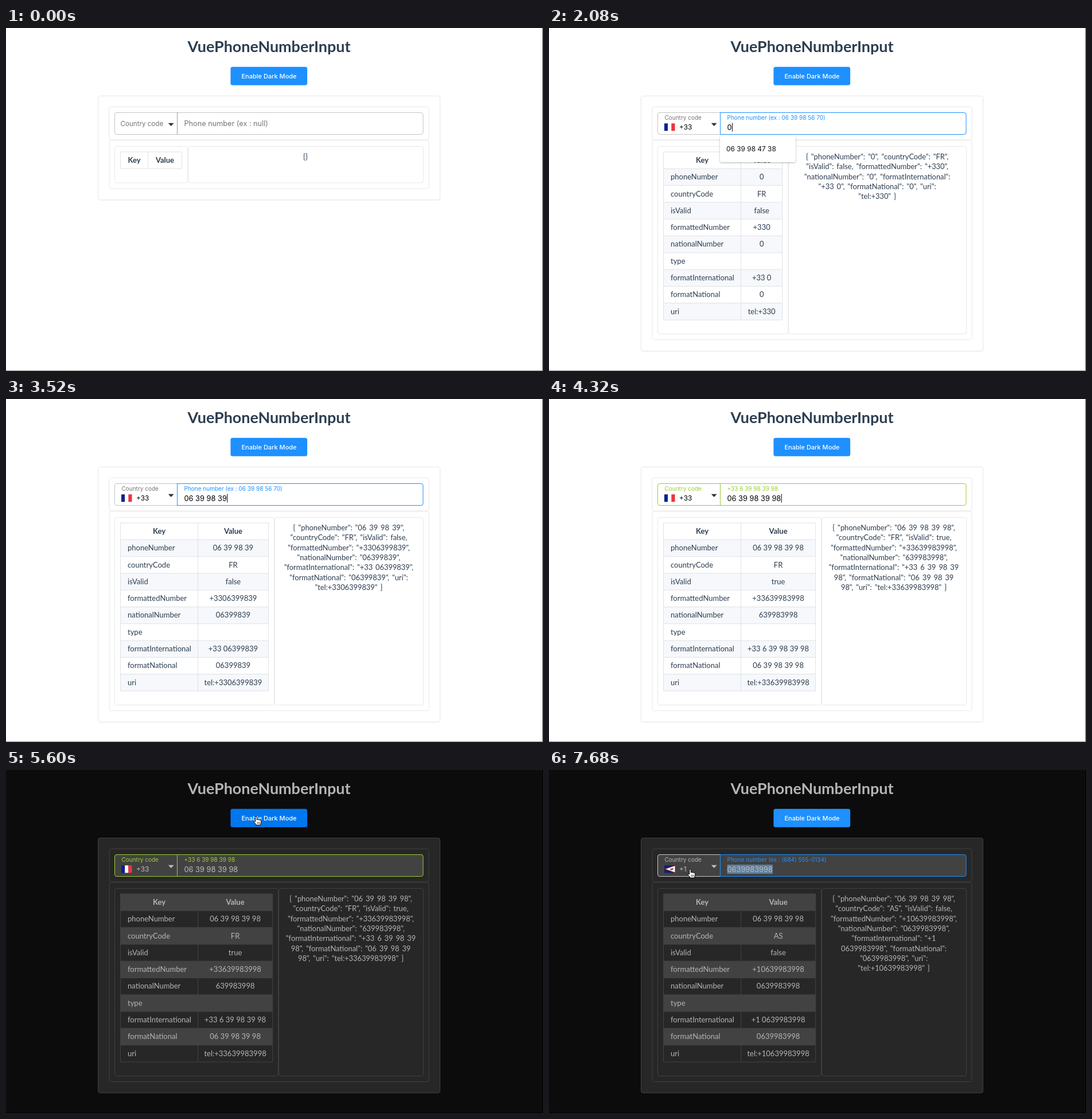
Write an HTML page that moves like this. It is 936 by 598 pixels and loops after 8000 ms.

```html
<!DOCTYPE html>
<html lang="en">
<head>
<meta charset="utf-8">
<title>VuePhoneNumberInput</title>
<style>
  html, body { margin: 0; width: 100%; height: 100%; overflow: hidden; }
  svg { display: block; }
  text { font-family: Inter, sans-serif; white-space: pre; }
  .page { font-family: Lato, sans-serif; }
  .json { word-spacing: .13em; }
  .shadow { filter: drop-shadow(0 1px 1.5px rgba(0, 0, 0, .3)); }
  .soft { filter: drop-shadow(0 1px 1px rgba(0, 0, 0, .04)); }
</style>
</head>
<body>
<svg id="stage" width="936" height="598" viewBox="0 0 936 598">
  <clipPath id="menu"><rect x="190" y="186" width="210" height="192"/></clipPath>
  <g id="scene"></g>
</svg>
<script>
const LOOP = 8000, STEP = 160, BLUE = '#1e90ff', GREEN = '#9acd32';
const LIGHT = {
  page: '#fff', card: '#fff', line: '#e9e9e9', text: '#2c3e50', field: '#fff', edge: '#c4c4c4',
  hint: '#747474', value: '#000', arrow: '#333', header: '#fff', odd: '#f6f8fb', even: '#fff',
  grid: '#dfe2e5', item: '#2c3e50', hover: '#f2f2f2', right: '#444', bottom: '#888'
};
const DARK = {
  page: '#0c0c0c', card: '#272727', line: '#404040', text: '#b5b5b5', field: '#424242', edge: '#c8c8c8',
  hint: '#b5b5b5', value: '#bdbdbd', arrow: '#bdbdbd', header: '#424242', odd: '#272727', even: '#424242',
  grid: '#424242', item: '#b9b9b9', hover: '#383838', right: '#000', bottom: '#000'
};
const TYPING = [
  [2080, '0'], [2240, '06'], [2400, '06 3'], [2720, '06 39'], [2880, '06 39 9'], [3040, '06 39 98'],
  [3200, '06 39 98 3'], [3520, '06 39 98 39'], [3840, '06 39 98 39 9'], [4160, '06 39 98 39 98']
];
const SUGGESTION = '06 39 98 47 38';
const EXAMPLES = { FR: '06 39 98 56 70', AS: '(684) 555-0134' };
const KEYS = ['phoneNumber', 'countryCode', 'isValid', 'formattedNumber', 'nationalNumber', 'type',
  'formatInternational', 'formatNational', 'uri'];
// Pointer trips: start time, end time, from, to, hidden from
const TRIPS = [
  [160, 640, 300, 300, 222, 169, 1760],
  [4960, 5440, 446, 330, 437, 82, 6080],
  [5920, 6240, 437, 82, 247, 174, LOOP]
];

const rect = (x, y, w, h, fill, more = '') =>
  `<rect x="${x}" y="${y}" width="${w}" height="${h}" fill="${fill}" ${more}/>`;
const path = (d, fill, more = '') => `<path d="${d}" fill="${fill}" ${more}/>`;
const text = (x, y, s, size, fill, more = '') =>
  `<text x="${x}" y="${y}" font-size="${size}" fill="${fill}" ${more}>${s}</text>`;
const box = (x, y, right, bottom, fill, stroke, more = '') =>
  rect(x, y, right - x, bottom - y, fill, `rx="3.5" stroke="${stroke}" ${more}`);

const ctx = document.createElement('canvas').getContext('2d');
ctx.font = '12.8px Inter, sans-serif';
const inputWidth = s => ctx.measureText(s).width;

// Flags fill an 18.5 by 13 box
const rows = (...c) => c.map((f, i) => rect(0, i * 13 / c.length, 18.5, 13 / c.length, f)).join('');
const cols = (...c) => c.map((f, i) => rect(i * 18.5 / c.length, 0, 18.5 / c.length, 13, f)).join('');
const cross = (fill, w) => rect(6.5 - w / 2, 0, w, 13, fill) + rect(0, 6.5 - w / 2, 18.5, w, fill);
const dot = (x, y, r, fill) => `<circle cx="${x}" cy="${y}" r="${r}" fill="${fill}"/>`;
const ensign = field => rows(field) + rect(0, 0, 9, 6.5, '#1c2f7c') +
  path('M0 0L9 6.5M9 0L0 6.5M4.5 0V6.5M0 3.2H9', 'none', 'stroke="#fff" stroke-width="1.8"') +
  path('M4.5 0V6.5M0 3.2H9', 'none', 'stroke="#d22" stroke-width="1"') +
  rect(12, 4, 3.6, 4.5, '#fff') + rect(12, 4, 3.6, 1.3, '#d22');
const FLAGS = {
  FR: cols('#0a2090', '#fff', '#f0323c'),
  AS: rows('#10206e') + path('M0 6.5L18.5 0V13Z', '#c0202c') + path('M2.5 6.5L18.5 1V12Z', '#fff') +
    path('M10 6L16 4.5L15 8L11 8.5Z', '#8a5a30'),
  FO: rows('#fff') + cross('#2a62b8', 4.4) + cross('#e8303c', 2.2),
  FJ: ensign('#68b8e4'),
  FI: rows('#fff') + cross('#10307e', 3.6),
  GF: rows('#0a8a36') + path('M0 0V13H18.5Z', '#f8dc1c') + dot(9.2, 6.5, 1.7, '#d8242c'),
  PF: rows('#d42838', '#fff', '#fff', '#d42838') + dot(9.2, 6.5, 2.6, '#e8b060') + dot(9.2, 7.3, 1.3, '#4870b0'),
  GA: rows('#1fa04c', '#f6d81c', '#3a75c4'),
  AF: cols('#000', '#c8202c', '#108040') + dot(9.2, 6.5, 2, '#fff'),
  AL: rows('#e02028') + path('M9.2 2L13 5L10.5 10.5H8L5.5 5Z', '#000'),
  DZ: cols('#106838', '#fff') + dot(9.2, 6.5, 2.8, '#d22034') + dot(10.2, 6.5, 2.1, '#fff'),
  AD: cols('#1a2a90', '#f8d820', '#d02038') + dot(9.2, 6.5, 1.8, '#c08850'),
  AO: rows('#d0202c', '#000') + dot(9.2, 6.5, 2, '#f8d820'),
  AI: ensign('#1c2f7c')
};
const flag = (code, x, y) => `<g transform="translate(${x} ${y})">${FLAGS[code]}</g>`;
const F_LIST = [['FO', 'Faroe Islands (Føroyar)'], ['FJ', 'Fiji'], ['FI', 'Finland (Suomi)'], ['FR', 'France'],
  ['GF', 'French Guiana (Guyane française)'], ['PF', 'French Polynesia (Polynésie française)'], ['GA', 'Gabon']];
const A_LIST = [['AF', 'Afghanistan'], ['AL', 'Albania (Shqipëri)'], ['DZ', 'Algeria'], ['AS', 'American Samoa'],
  ['AD', 'Andorra'], ['AO', 'Angola'], ['AI', 'Anguilla']];

function payload(phone, country) {
  if (!country) return {};
  if (!phone) return { countryCode: country, isValid: false };
  const digits = phone.replace(/ /g, ''), prefix = country === 'FR' ? '+33' : '+1';
  const isValid = country === 'FR' && digits.length === 10;
  const national = isValid ? digits.slice(1) : digits;
  return {
    phoneNumber: phone, countryCode: country, isValid,
    formattedNumber: prefix + national, nationalNumber: national,
    formatInternational: prefix + ' ' + (isValid ? phone.slice(1) : digits),
    formatNational: isValid ? phone : digits, uri: 'tel:' + prefix + national
  };
}

function stateAt(t) {
  const typed = TYPING.filter(k => k[0] <= t).pop();
  const phone = typed ? typed[1] : '';
  const country = t < 1760 ? '' : t < 7040 ? 'FR' : 'AS';
  const trip = TRIPS.filter(k => k[0] <= t).pop();
  let pointer = null;
  if (trip && t < trip[6]) {
    const [from, to, x0, y0, x1, y1] = trip, k = Math.min(1, (t - from) / (to - from));
    pointer = [x0 + (x1 - x0) * k, y0 + (y1 - y0) * k];
  }
  return {
    t, phone, country, pointer, data: payload(phone, country), theme: t < 5600 ? LIGHT : DARK,
    open: t >= 800 && t < 1760 || t >= 6400 && t < 7040,
    focus: t >= 1760 && t < 4960 || t >= 7200,
    selected: t >= 7200
  };
}

function header({ theme, pointer }) {
  const hover = pointer && pointer[1] < 100 && pointer[0] > 391;
  return text(458.5, 41.5, 'VuePhoneNumberInput', 26.9, theme.text, 'class="page" font-weight="700" text-anchor="middle"') +
    rect(391.4, 67.7, 133.7, 32, hover ? '#0077ee' : BLUE, 'rx="3.5"') +
    text(458.5, 87.8, 'Enable Dark Mode', 11, '#fff', 'font-weight="500" text-anchor="middle"');
}

function field({ t, theme, country, phone, data, open, focus, selected }) {
  const valid = data.isValid, live = valid ? GREEN : focus ? BLUE : theme.edge;
  const edge = valid ? GREEN : open ? BLUE : theme.edge;
  const divider = focus || valid ? live : open ? BLUE : '#999';
  const shown = selected ? phone.replace(/ /g, '') : phone;
  let s = path('M298.5 147.5H723.5q3.5 0 3.5 3.5V182q0 3.5-3.5 3.5H298.5', theme.field, `stroke="${live}"`) +
    path('M298.5 147.5H193q-3.5 0-3.5 3.5V182q0 3.5 3.5 3.5H298.5', theme.field, `stroke="${edge}"`) +
    path('M298.5 147V186', 'none', `stroke="${divider}"`) +
    path(open ? 'M282.8 169.4L287.7 164.2L292.6 169.4Z' : 'M282.8 165.8L287.7 170.9L292.6 165.8Z', theme.arrow);
  if (!country) {
    return s + text(199.5, 171, 'Country code', 11.6, theme.hint) +
      text(310.5, 171.3, 'Phone number (ex : null)', 12.7, theme.hint);
  }
  const label = valid ? data.formatInternational : `Phone number (ex : ${EXAMPLES[country]})`;
  s += text(201.5, 160, 'Country code', 10, valid ? GREEN : theme.hint) +
    flag(country, 201, 166.3) +
    text(227, 177, country === 'FR' ? '+33' : '+1', 11.9, theme.value) +
    text(310.5, 160, label, 10, valid ? GREEN : BLUE);
  const width = inputWidth(shown);
  if (selected) s += rect(310.5, 165, width, 16, '#5f7f9f');
  s += text(310.5, 177.7, shown, 12.8, theme.value);
  const blinkOn = t < 4160 || (t - 4160) % 960 < 480;
  if (focus && !selected && blinkOn) s += rect(311 + width, 165.5, 1, 15, theme.value);
  return s;
}

function wrap(words, limit) {
  const lines = [''];
  for (const word of words) {
    const last = lines[lines.length - 1], joined = last ? last + ' ' + word : word;
    if (joined.length > limit && last) lines.push(word);
    else lines[lines.length - 1] = joined;
  }
  return lines;
}

function results({ theme, data, country }) {
  const digits = data.formattedNumber ? data.formattedNumber.length - 1 : 0;
  const divider = country ? 334.5 : 247.5;
  const right = divider + (country ? Math.max(59, 94 + 7.23 * (digits - 6)) : 59);
  const split = right + 10.4, bottom = country ? 533.5 : 270, rowHeight = 29.3;
  const middle = (divider + right) / 2, keys = country ? KEYS : [];
  let s = box(189.5, 206.5, split - .5, bottom, 'none', theme.line) +
    box(split + .5, 206.5, 727.5, bottom, 'none', theme.line);
  s += rect(199.5, 216, right - 199.5, rowHeight, theme.header);
  const head = 'class="page" font-weight="700" text-anchor="middle"';
  let grid = `M199.5 216H${right}M199.5 245.3H${right}`, cells = text((199.5 + divider) / 2, 235, 'Key', 13, theme.text, head) +
    text(middle, 235, 'Value', 13, theme.text, head);
  keys.forEach((key, i) => {
    const y = 216 + rowHeight * (i + 1);
    s += rect(199.5, y, right - 199.5, rowHeight, i % 2 ? theme.even : theme.odd);
    grid += `M199.5 ${y + rowHeight}H${right}`;
    cells += text(212, y + 18.9, key, 13, theme.text, 'class="page"') +
      text(middle, y + 18.9, data[key] ?? '', 13, theme.text, 'class="page" text-anchor="middle"');
  });
  const end = 216 + rowHeight * (keys.length + 1);
  grid += `M199.5 216V${end}M${divider} 216V${end}M${right} 216V${end}`;
  s += path(grid, 'none', `stroke="${theme.grid}"`) + cells;

  const pairs = Object.entries(data).map(([k, v]) => `"${k}": ${JSON.stringify(v)}`);
  const json = pairs.length ? `{ ${pairs.join(', ')} }` : '{}';
  wrap(json.split(' '), Math.floor((727 - split) / 6.6)).forEach((line, i) => {
    s += text((split + 727) / 2, 229 + i * 17.35, line, 12.85, theme.text, 'class="page json" text-anchor="middle"');
  });
  return s;
}

function menu({ t, theme, country }) {
  const late = t >= 1440 && t < 6880;
  const hovered = t < 1440 ? -1 : late && theme === DARK ? 0 : 3;
  let s = box(190, 186, 400, 378, theme.field, 'none', 'class="shadow"') + '<g clip-path="url(#menu)">';
  (late ? F_LIST : A_LIST).forEach(([code, name], i) => {
    const y = 199 + i * 27.5, chosen = code === country;
    if (chosen || i === hovered) s += rect(190, y - 13.7, 210, 27.5, chosen ? BLUE : theme.hover);
    s += flag(code, 198.3, y - 6.5) +
      text(226, y + 4, name, 10.85, chosen ? '#fff' : theme.item, chosen ? 'font-weight="700"' : '');
  });
  s += '</g>';
  if (late && theme === LIGHT) s += rect(391.5, 237, 6.5, 22, '#7f7f7f', 'rx="3.2"');
  return s;
}

function hand([x, y]) {
  const d = 'M-1.5 9V1.2a1.3 1.3 0 0 1 2.6 0V6a1.3 1.2 0 0 1 2.6.3a1.3 1.2 0 0 1 2.5.5' +
    'a1.2 1.2 0 0 1 2.3.6V10.5L7.3 15H.5L-4 9.8a1.3 1.3 0 0 1 2.5-.8Z';
  return `<g transform="translate(${x - .8} ${y - 1})">` + path(d, '#fff', 'stroke="#000"') +
    path('M2 9.5V13M4 9.5V13M6 9.5V13', 'none', 'stroke="#000" stroke-width=".7"') + '</g>';
}

function arrow([x, y]) {
  return path(`M${x} ${y}v13l3-2.8l2.2 4.8l2-.9l-2.1-4.7h4.2Z`, '#000', 'stroke="#fff"');
}

function pointer({ pointer: p }) {
  const overButton = p[1] > 67 && p[1] < 100 && p[0] > 391;
  const overCountry = p[1] > 147 && p[1] < 186 && p[0] < 299;
  return overButton || overCountry ? hand(p) : arrow(p);
}

function draw(t) {
  const state = stateAt(t), { theme, country, phone, focus } = state;
  let s = rect(0, 0, 936, 598, theme.page) + header(state);
  s += box(160.5, 118.5, 756.5, country ? 563 : 299.5, theme.card, theme.line, 'class="soft"') +
    box(180, 137.5, 737, 195, theme.card, theme.line, 'class="soft"') +
    box(180, 196, 737, country ? 543.5 : 280, theme.card, theme.line);
  s += results(state) + field(state);
  if (focus && phone && SUGGESTION.startsWith(phone)) {
    s += box(298, 188, 430, 234, '#fff', 'none', 'class="shadow"') + text(309, 215, SUGGESTION, 11.9, '#111');
  }
  if (state.open) s += menu(state);
  if (state.pointer) s += pointer(state);
  return s + rect(935, 0, 1, 598, theme.right) + rect(0, 597, 936, 1, theme.bottom);
}

const scene = document.getElementById('scene'), start = performance.now();
let drawn = -1;
function tick() {
  const t = Math.floor((performance.now() - start) % LOOP / STEP) * STEP;
  if (t !== drawn) scene.innerHTML = draw(drawn = t);
  requestAnimationFrame(tick);
}
tick();
</script>
</body>
</html>
```
